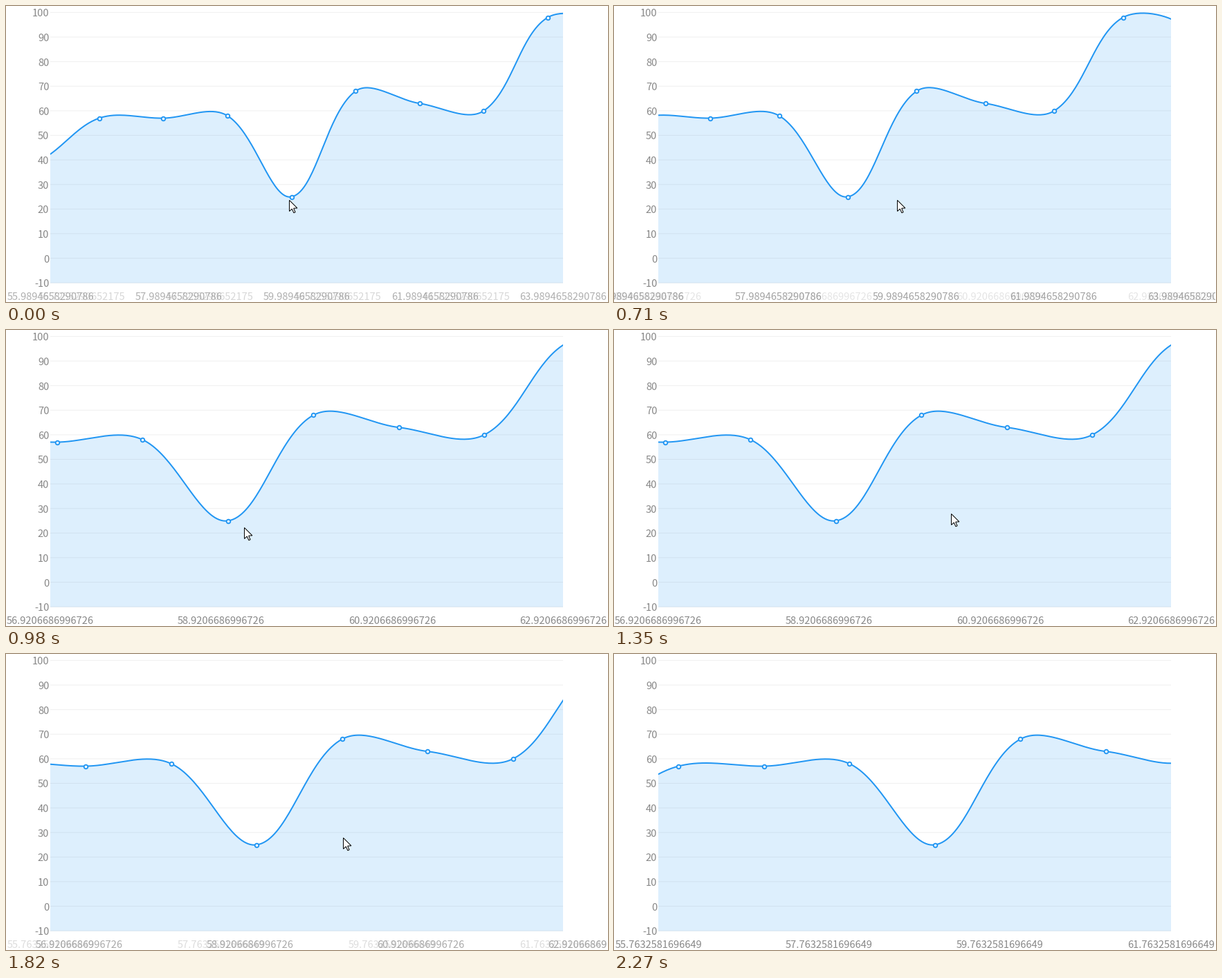
A matplotlib script that plays this animation: 870 by 429 pixels, repeating every 2980 ms.

```python
import numpy as np
import matplotlib.pyplot as plt
from matplotlib.animation import FuncAnimation
from matplotlib.patches import Polygon, Rectangle

W, H, DPI = 870, 429, 64
LOOP, TICK = 2980, 10
PT = 72 / DPI                      # points per pixel
LEFT, RIGHT, TOP, UNIT = 64, 805, 9.4, 3.5616
BLUE, GREY = "#2196f3", "#888888"
SMOOTH, DURATION = 0.7, 340

FIRST_X = 54
VALUES = np.array([38, 39, 57, 57, 58, 25, 68, 63, 60, 98, 91, 15])

# Axis windows: (minimum, span)
VIEWS = [(53.7255290652175, 8), (55.9894658290786, 8),
         (56.9206686996726, 6), (55.7632581696649, 6)]
# Transitions: begin, first redraw, last redraw, number of intervals
MOVES = [(-227, 0, 100, 2), (635, 710, 980, 6), (1693, 1750, 2000, 6)]

# Pointer rests and glides between these times
POINTER_T = [850, 970, 1170, 1330, 2130, 2250]
POINTER_X = [409, 344, 344, 487, 487, 783]
POINTER_Y = [281, 286, 286, 266, 266, 412]
POINTER_GONE = 2270
ARROW = np.array([(0, 0), (0, 16), (3.8, 12.6), (6.4, 18.3), (8.6, 17.3),
                  (6.2, 11.7), (11.4, 11.4)]) + 0.5


def lerp(a, b, p):
    return a + (b - a) * p


def y_px(v):
    return TOP + (100 - v) * UNIT


def x_px(v, view):
    return LEFT + (v - view[0]) * (RIGHT - LEFT) / view[1]


def bezier_controls(view):
    """Four control points of every smoothed segment, in pixels."""
    xs = x_px(FIRST_X + np.arange(len(VALUES)), view)
    p = np.column_stack([xs, y_px(VALUES)])
    mid = (p[1:] + p[:-1]) / 2
    size = np.hypot(*(p[1:] - p[:-1]).T)
    k = (size[:-1] / (size[:-1] + size[1:]))[:, None]
    m = lerp(mid[:-1], mid[1:], k)
    knots = p[1:-1]
    out = knots + (mid[1:] - m) * SMOOTH
    into = knots + (mid[:-1] - m) * SMOOTH
    return np.stack([knots[:-1], out[:-1], into[1:], knots[1:]])


CONTROLS = [bezier_controls(v) for v in VIEWS]
T = np.linspace(0, 1, 40)
BASIS = np.stack([(1 - T)**3, 3 * T * (1 - T)**2, 3 * T**2 * (1 - T), T**3])


def transition(ms):
    """Index of the current transition and its stepped linear progress."""
    i = max(j for j, move in enumerate(MOVES) if move[1] <= ms)
    begin, first, last, steps = MOVES[i]
    if ms >= last:
        return i, 1.0
    gap = (last - first) / steps
    now = first + gap * ((ms - first) // gap)
    return i, (now - begin) / DURATION


fig = plt.figure(figsize=(W / DPI, H / DPI), dpi=DPI, facecolor="white")
ax = fig.add_axes([0, 0, 1, 1])
ax.set(xlim=(0, W), ylim=(H, 0))
ax.axis("off")
FONT = dict(family="Noto Sans CJK JP", size=14.65 * PT, color=GREY,
            va="baseline")

for v in range(-10, 101, 10):
    y = y_px(v)
    ax.plot([LEFT, RIGHT], [y, y], color="#f0f0f0", lw=PT, zorder=1,
            solid_capstyle="butt", snap=False)
    ax.text(62.3, y + 6, str(v), ha="right", **FONT)

plot_area = Rectangle((LEFT, 0), RIGHT - LEFT, 401.5, transform=ax.transData)
area = ax.add_patch(Polygon([(0, 0), (1, 1)], fc=BLUE, alpha=0.15, lw=0,
                            zorder=2))
line, = ax.plot([], [], color=BLUE, lw=2 * PT, zorder=3)
dots, = ax.plot([], [], "o", ms=5.6 * PT, mfc="white", mec=BLUE,
                mew=1.9 * PT, zorder=4, snap=False)
for artist in (area, line, dots):
    artist.set_clip_path(plot_area)

old_labels, new_labels = ([ax.text(0, 426.4, "", ha="center", zorder=z,
                                   clip_on=True, **FONT) for _ in range(5)]
                          for z in (5, 6))
ax.add_patch(Rectangle((868.5, 405), 2, 24, fc="white", lw=0, zorder=7))
pointer = ax.add_patch(Polygon(ARROW, fc="white", ec="black", lw=PT,
                               joinstyle="miter", zorder=8))


def place_labels(labels, source, target, p, alpha):
    """Ticks of the source window, moved by p towards the target window."""
    count = source[1] // 2 + 1
    for i, label in enumerate(labels):
        tick = source[0] + 2 * i
        label.set_visible(i < count and alpha > 0)
        label.set_text(f"{tick:.13f}")
        label.set_x(lerp(x_px(tick, source), x_px(tick, target), p))
        label.set_alpha(alpha)


def draw(frame):
    ms = frame * TICK
    i, p = transition(ms)
    before, after = VIEWS[i], VIEWS[i + 1]

    ctrl = lerp(CONTROLS[i], CONTROLS[i + 1], p)
    curve = np.einsum("kt,ksd->std", BASIS, ctrl).reshape(-1, 2)
    line.set_data(curve[:, 0], curve[:, 1])
    base = y_px(-10) + 0.4
    area.set_xy(np.vstack([curve, (curve[-1, 0], base), (curve[0, 0], base)]))
    dots.set_data(ctrl[3, :, 0], ctrl[3, :, 1])

    # Outgoing labels ride the axis, incoming ones fade in at rest
    place_labels(old_labels, before, after, p, 1 - p)
    place_labels(new_labels, after, after, 0, p)

    now = ms - (ms - 10) % 40
    spot = [np.interp(now, POINTER_T, k) // 1 for k in (POINTER_X, POINTER_Y)]
    pointer.set_xy(ARROW + spot)
    pointer.set_visible(ms < POINTER_GONE)
    return area, line, dots, pointer, *old_labels, *new_labels


anim = FuncAnimation(fig, draw, frames=LOOP // TICK, interval=TICK,
                     repeat=True, repeat_delay=0)
plt.show()
```
